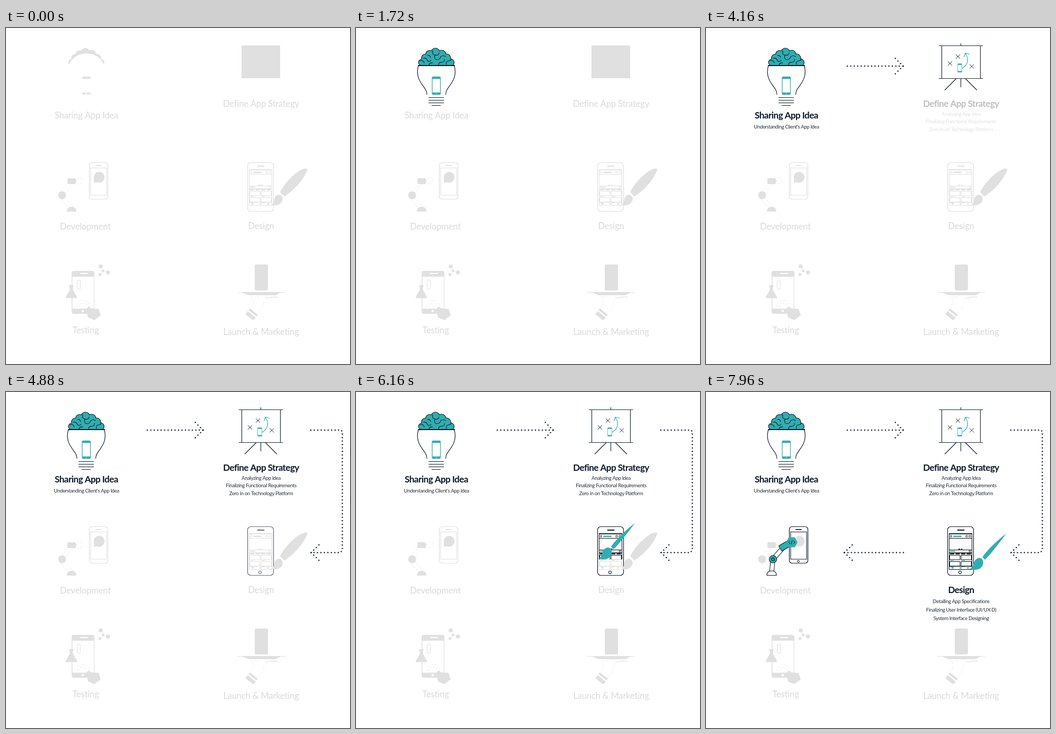
Recreate the animation shown at these times as an HTML page with a canvas. Size 650 by 635 pixels, loop 8 s.

```html
<!DOCTYPE html>
<html lang="en">
<head>
<meta charset="utf-8">
<title>App process</title>
<style>
html, body { margin: 0; width: 100%; height: 100%; overflow: hidden; background: #fff; }
canvas { display: block; }
</style>
</head>
<body>
<canvas id="stage" width="650" height="635"></canvas>
<script>
const ctx = document.getElementById('stage').getContext('2d');
const LOOP = 8000, STEP = 40;
const TEAL = '#30adb0', INK = '#0f1c2c', GHOST = '#e0e0e0', WHITE = '#fff';

const ramp = (t, a, b) => Math.min(1, Math.max(0, (t - a) / (b - a)));
const smooth = p => p * p * (3 - 2 * p);
const mix = (a, b, p) => a + (b - a) * p;

function group(alpha, draw) {
  if (alpha <= 0) return;
  ctx.save();
  ctx.globalAlpha *= alpha;
  draw();
  ctx.restore();
}

function paint(path, fill, stroke, width = 1) {
  if (fill) { ctx.fillStyle = fill; ctx.fill(path); }
  if (stroke) { ctx.strokeStyle = stroke; ctx.lineWidth = width; ctx.stroke(path); }
}

const shape = (d, fill, stroke, width) => paint(new Path2D(d), fill, stroke, width);

function box(x, y, w, h, r, fill, stroke, width) {
  const p = new Path2D();
  p.roundRect(x, y, w, h, r);
  paint(p, fill, stroke, width);
}

function disc(x, y, r, fill, stroke, width) {
  const p = new Path2D();
  p.arc(x, y, r, 0, 7);
  paint(p, fill, stroke, width);
}

function dashed(d, color = GHOST) {
  ctx.save();
  ctx.setLineDash([2, 3]);
  shape(d, null, color, 1);
  ctx.restore();
}

function label(str, x, y, font, spacing, color) {
  ctx.font = font + ' Lato, "Open Sans", sans-serif';
  ctx.letterSpacing = spacing + 'px';
  ctx.textAlign = 'center';
  ctx.fillStyle = color;
  ctx.fillText(str, x, y);
}

// Pale heading turns bold and darkens while its lines fade in.
function heading(str, x, y, alpha = 0, lines = [], first = 0, gap = 0) {
  const bold = color => label(str, x, y, 'bold 17px', -0.52, color);
  if (alpha <= 0) {
    label(str, x, y, '16.5px', -0.15, '#dadada');
    return;
  }
  bold('#dadada');
  group(alpha, () => {
    bold(INK);
    lines.forEach((s, i) => label(s, x, first + gap * i, '9.7px', -0.42, '#26323e'));
  });
}

// Dotted route along a polyline with an arrowhead at its end.
function route(points, dir, p) {
  if (p <= 0) return;
  const dots = [];
  let rest = 0;
  for (let i = 1; i < points.length; i++) {
    const [ax, ay] = points[i - 1], [bx, by] = points[i];
    const len = Math.hypot(bx - ax, by - ay);
    let s = rest;
    for (; s <= len; s += 6.55) dots.push([mix(ax, bx, s / len), mix(ay, by, s / len)]);
    rest = s - len;
  }
  const [ex, ey] = points[points.length - 1];
  for (let k = 0; k < 4; k++) {
    dots.push([ex - dir * 4.9 * k, ey - 4.8 * k], [ex - dir * 4.9 * k, ey + 4.8 * k]);
  }
  dots.slice(0, Math.ceil(dots.length * p)).forEach(([x, y]) => disc(x, y, 1.25, INK));
}

// --- Idea ---
const LOBES = [[124, 65, 6], [131, 57, 7.5], [139, 50, 7.5], [150, 46.5, 8.5],
  [162, 50, 8], [171, 57, 8], [179, 65, 6.5]];

function lobes(color, grow) {
  LOBES.forEach(([x, y, r]) => disc(x, y, r + grow, color));
  shape('M124 72 L125 60 L138 46 L162 46 L178 60 L180 72Z', color);
}

function brain(scale) {
  ctx.save();
  ctx.translate(0, 71);
  ctx.scale(1, scale);
  ctx.translate(0, -71);
  ctx.beginPath();
  ctx.rect(110, 30, 85, 41);
  ctx.clip();
  lobes(INK, 0.5);
  lobes(TEAL, -0.6);
  ctx.lineCap = 'round';
  shape('M121 62 Q127 60 129 66 M127 57 Q134 56 135 62 Q139 65 142 61 M135 52 Q140 51 141 56' +
    'M145 43 Q143 50 149 51 Q156 53 157 47 M138 70 Q139 65 145 66 M149 51 Q147 58 152 60' +
    'Q159 60 160 54 Q165 51 169 54 M156 70 Q156 64 162 65 Q168 64 167 59 M171 69 Q169 63 175 62' +
    'Q180 62 180 58', null, INK, 1.1);
  ctx.restore();
}

function miniPhone(x, y, w, h, bar) {
  box(x, y, w, h, bar / 2, WHITE, TEAL, bar / 3);
  box(x, y, w, bar, bar / 3, TEAL);
  box(x, y + h - bar, w, bar, bar / 3, TEAL);
  disc(x + w / 2, y + h - bar / 2, bar / 5, WHITE);
}

function idea(t) {
  lobes(GHOST, 0.3);
  ctx.fillStyle = WHITE;
  ctx.beginPath();
  ctx.ellipse(152, 82, 36, 34, 0, 0, 7);
  ctx.fill();
  ctx.fillRect(110, 70, 85, 8);
  box(144, 92, 16, 4, 1.5, GHOST);
  box(144, 122, 16, 3.5, 1.5, GHOST);
  box(150, 123, 4, 1.5, 0.5, WHITE);

  group(ramp(t, 0, 400), () => {
    shape('M118 71 C114 84 117 95 123 104 C128 112 134 117 134 126' +
      'M185.5 71 C189.5 84 186.5 95 180.5 104 C175.5 112 169.5 117 169.5 126' +
      'M137 131.5H166 M137 136.5H166 M137 141.5H166 M143 146.5H160', null, INK, 1.2);
  });

  const drop = ramp(t, 800, 1200);
  group(ramp(t, 780, 880), () => {
    const y = drop < 0.6 ? mix(6, 97, (drop / 0.6) ** 2) : mix(97, 92.5, smooth((drop - 0.6) / 0.4));
    miniPhone(144, y, 15.5, 33, 3.8);
  });

  const grown = ramp(t, 1400, 1720);
  group(ramp(t, 0, 400) * (1 - ramp(t, 1400, 1560)), () => {
    const open = smooth(ramp(t, 580, 840)) - smooth(ramp(t, 1140, 1400));
    ctx.translate(186, 71);
    ctx.rotate(open * 1.53);
    shape('M-68 0 C-58 -30 -10 -30 0 0', null, INK, 1.3);
  });
  if (grown > 0) {
    brain(Math.sin(grown * Math.PI / 2));
    shape('M117 71H187', null, INK, 1.8);
  }
  heading('Sharing App Idea', 152, 170.5, ramp(t, 2240, 2560),
    ["Understanding Client's App Idea"], 189.5);
}

// --- Strategy ---
function strategy(t) {
  const down = ramp(t, 2776, 3320), edge = mix(33.5, 95.5, down);
  box(445, 33, 73, 62, 0, GHOST);
  group(ramp(t, 2640, 2780), () => {
    shape('M481.5 29V112 M481.5 87L451 117.5 M481.5 87L512 117.5', null, INK, 1.1);
    ctx.fillStyle = WHITE;
    ctx.fillRect(445, 33, 73, edge - 33);
    ctx.save();
    ctx.beginPath();
    ctx.rect(440, 33, 85, edge - 33);
    ctx.clip();
    [[461, 67], [476, 54], [502, 72.5]].forEach(([x, y]) =>
      shape(`M${x - 4} ${y - 4}l8 8m0 -8l-8 8`, null, INK, 0.9));
    shape('M484 76 C496 69 497 58 490 48 M487.5 55L490 47.5L498 49.5', null, TEAL, 1.2);
    miniPhone(475.5, 67.5, 8, 16, 2.2);
    ctx.restore();
    shape(`M445.5 33V${edge} M518.5 33V${edge} M440 33.5H523.5 M440 ${edge}H523.5`, null, '#1b3036', 1.2);
  });
  heading('Define App Strategy', 482, 148.5, ramp(t, 4120, 4400),
    ['Analyzing App Idea', 'Finalizing Functional Requirements', 'Zero in on Technology Platform'], 165.5, 14.6);
}

// --- Design ---
function screenUi(line, accent) {
  box(459.5, 267.5, 43, 68, 0, WHITE, line);
  shape('M459 268H503 M459 304H503', null, line, 1.6);
  shape('M459 276.5H503 M459 298.5H503 M459 329.5H503', null, line);
  disc(463, 272.5, 1.5, null, line);
  disc(492.5, 272.5, 1.8, null, line);
  disc(498.5, 272.5, 1.8, null, line);
  disc(498.5, 301, 1.5, null, line);
  box(467, 271.5, 16, 2.4, 1, accent);
  box(461, 300, 10, 1.8, 0, accent);
  box(477, 296, 3, 1.6, 0, line);
  box(481.5, 296, 3, 1.6, 0, line);
  for (let i = 0; i < 4; i++) {
    box(461 + i * 10.5, 305, 8, 1.8, 0, line);
    const x = 460.5 + (i % 2) * 21.5, y = i < 2 ? 308.5 : 320.5;
    box(x, y, 19.5, 8.5, 0, null, line);
    box(x + 1, y + 9.4, 6, 1.1, 0, accent);
  }
  [464, 479, 493].forEach(x => box(x, 331.3, 4, 2.4, 0, accent));
}

function phone(x, y, w, h, r, color) {
  box(x, y, w, h, r, WHITE, color, 1.2);
}

function designPhone(color) {
  phone(456.5, 254.5, 49, 92, 6, color);
  box(474.5, 260, 14, 2, 1, color);
  if (color === INK) disc(480, 340.8, 2.6, null, color, 1.1);
  else disc(480, 340.8, 0.8, color);
}

function brush(dx, dy) {
  ctx.save();
  ctx.translate(498 + dx, 335 + dy);
  shape('M0 -1 C6 -2 6 -8 9 -14 C12 -21 19 -23 23.5 -19.5 C28 -14 26 -5 19 -1 C13 2 6 1.5 0 -1Z', TEAL);
  shape('M24.5 -23 L29 -18 C40 -28 56 -50 69.5 -67.5 C54 -56 33 -36 24.5 -23Z', TEAL);
  ctx.restore();
}

function design(t) {
  const p = ramp(t, 5000, 6560);
  const dx = -20.5 + 20.5 * Math.cos(12 * Math.PI * p);
  const dy = -66 * (1 - p ** 1.2);
  designPhone(GHOST);
  group(ramp(t, 4760, 4960), () => designPhone(INK));
  screenUi(GHOST, GHOST);
  if (p > 0) {
    ctx.save();
    ctx.beginPath();
    ctx.rect(457, 262, 48, 74 + dy);
    ctx.clip();
    screenUi('#0a0f14', TEAL);
    ctx.restore();
  }
  group(1 - ramp(t, 6480, 6600), () => {
    shape('M518 310 L526 318.5 C545 306 564 285 569.5 267 Q567 264 560 267 C545 274 528 291 518 310Z', GHOST);
    shape('M502 335 Q506 331 507 324 C508 317 514 313 519 316 C525 320 523 328 518 332 Q512 336 502 335Z', GHOST);
  });
  if (t >= 5000) brush(dx, dy);
  heading('Design', 482, 380, ramp(t, 6590, 6935),
    ['Detailing App Specifications', 'Finalizing User Interface (UI/UX D)', 'System Interface Designing'], 398.5, 16);
}

// --- Development ---
function devPhone(color) {
  phone(157.5, 254.5, 35, 69, 5, color);
  box(169, 259, 12, 1.8, 1, color);
  box(160, 264.5, 30, 51.5, 0, null, color, 1.1);
  if (color === INK) disc(174.5, 320, 1.9, null, color);
}

function robot(p) {
  const jx = mix(106, 126.5, p), jy = 316;
  const hx = mix(139, 162, p), hy = mix(289, 284, p);
  const wx = mix(124, 148.5, p), wy = mix(289.5, 291, p);
  const r = mix(7.5, 11, p);
  const limb = (ax, ay, bx, by) => {
    ctx.lineCap = 'butt';
    shape(`M${ax} ${ay}L${bx} ${by}`, null, INK, 9);
    shape(`M${ax} ${ay}L${bx} ${by}`, null, WHITE, 7);
  };
  limb(124, 341, jx, jy);
  limb(jx, jy, wx, wy);
  shape('M115 346.5 Q115 338 124 338 Q133 338 133 346.5Z', WHITE, INK, 1.1);
  disc(jx, jy, 7, TEAL, INK, 1.1);
  disc(jx, jy, 2.6, TEAL, INK, 1.2);
  ctx.save();
  ctx.translate(wx, wy);
  ctx.rotate(mix(0, -0.53, p));
  box(-9.5, -5.8, 19, 11.6, 1, TEAL, INK, 1);
  ctx.restore();
  let hex = '';
  for (let i = 0; i < 6; i++) {
    const a = i * Math.PI / 3;
    hex += (i ? 'L' : 'M') + (hx + r * Math.cos(a)) + ' ' + (hy + r * Math.sin(a));
  }
  shape(hex + 'Z', TEAL);
  shape(`M${hx - 3} ${hy - 3}l-3 3l3 3m6 -6l3 3l-3 3m-2 -7l-2 8`, null, INK, 1);
}

function development(t) {
  devPhone(GHOST);
  group(ramp(t, 7200, 7400), () => devPhone(INK));
  disc(176, 282, 10.3, GHOST);
  shape('M166 284 L166 292.5 L175 291Z', GHOST);
  box(116, 284, 16, 11, 2, GHOST);
  disc(106, 316, 7.5, GHOST);
  shape('M115 347 Q115 338 124 338 Q133 338 133 347Z', GHOST);
  dashed('M133 289 a6 6 0 1 0 12 0 a6 6 0 1 0 -12 0 M107 307L117 296 M113 311L123 297' +
    'M105 324L117 340 M112 321L126 338');
  group(ramp(t, 7400, 7640), () => robot(smooth(ramp(t, 7760, 7960))));
  heading('Development', 150, 380.5);
}

// --- Testing and launch stay pale throughout ---
function testing() {
  box(124, 459, 43, 81, 4, GHOST);
  box(125.5, 470, 40.5, 60.5, 0, WHITE);
  box(140, 463, 15, 2, 1, WHITE);
  disc(145, 535, 2.3, WHITE);
  box(134.5, 476.5, 6, 17, 2, null, GHOST);
  shape('M119.5 486H127.5V489H126.5V495L134 508V510.5H113V508L120.5 495V489H119.5Z', GHOST);
  dashed('M134 526 a12 11 0 0 1 24 0 M139 526 a7 6 0 0 1 14 0');
  shape('M152 531 L156 526 L161 530 L175 531 L179 543 L167 552 L155 547Z', GHOST);
  [[179, 450.5, 3.8], [183.5, 459, 2.6], [192.7, 462, 3.8], [177.5, 466, 2.7]].forEach(a => disc(...a, GHOST));
  dashed('M179 450L183 459L193 462M183 459L178 466');
  heading('Testing', 150.5, 576.5);
}

function launch() {
  box(470, 447, 25, 49, 3, GHOST);
  shape('M437 499.5H527.5', null, GHOST, 1.2);
  shape('M446 500H519L509 505H459Z', GHOST);
  dashed('M462 508 Q472 515 463 529 M465 509Q470 507 478 509 M512 509Q494 508 487 517Q486 530 475 539');
  shape('M490 510.5 Q498 507.5 513 508.5', null, GHOST);
  shape('M461 530L476 542L473 545L458 533Z M456.5 535L472 547.5L467 552.5L452.5 541Z', GHOST);
  heading('Launch & Marketing', 482, 579.5);
}

function render(t) {
  ctx.fillStyle = WHITE;
  ctx.fillRect(0, 0, 650, 635);
  idea(t);
  strategy(t);
  development(t);
  design(t);
  testing();
  launch();
  route([[267, 72], [372.5, 72]], 1, ramp(t, 2440, 2760));
  route([[576, 72], [633, 72], [635.5, 75], [635.5, 299], [632, 303.5], [576.5, 303.5]], -1, ramp(t, 4380, 4800));
  route([[373, 303.5], [261.5, 303.5]], -1, ramp(t, 6920, 7240));
}

const start = performance.now();
function tick() {
  const t = (performance.now() - start) % LOOP;
  render(Math.floor(t / STEP) * STEP);
  requestAnimationFrame(tick);
}
tick();
</script>
</body>
</html>
```
